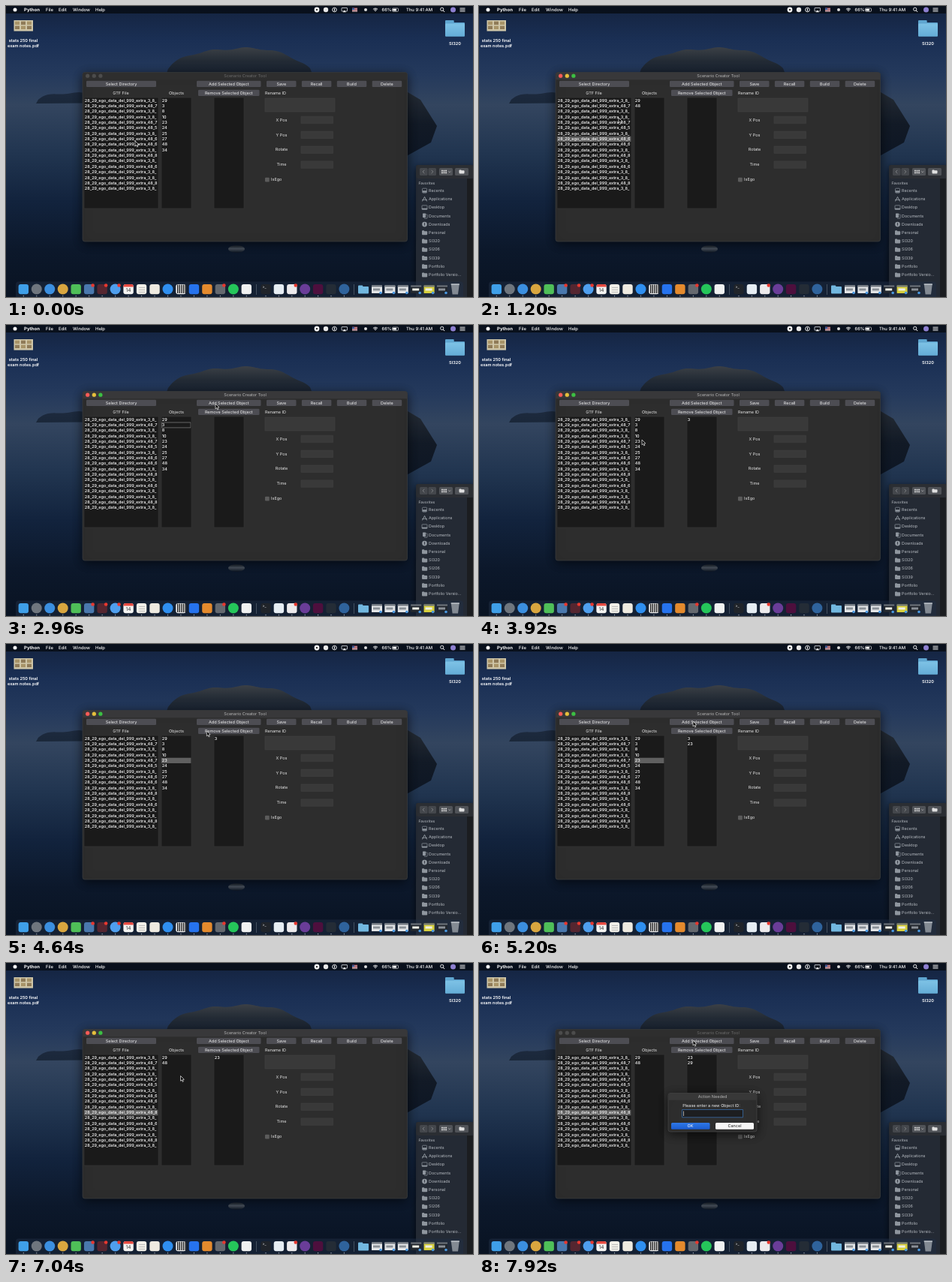
An HTML page with a canvas that plays this animation: 622 by 388 pixels, repeating every 8000 ms.

```html
<!DOCTYPE html>
<html lang="en">
<head>
<meta charset="utf-8">
<title>Scenario Creator Tool</title>
<style>
html, body { margin: 0; width: 622px; height: 388px; overflow: hidden; background: #0c1728; }
canvas { display: block; }
</style>
</head>
<body>
<canvas id="stage" width="622" height="388"></canvas>
<script>
const c = document.getElementById('stage').getContext('2d');
c.textRendering = 'geometricPrecision';
const LOOP = 8000, STEP = 80, HOLD = 320, CLICK = 240, ROW = 7.34;

const files = '3_8_ 48_7 3_8_ 3_8_ 48_7 48_5 3_8_ 48_6 48_6 3_8_ 48_8 3_8_ 48_6 3_8_ 3_8_ 48_8 3_8_'
  .split(' ').map(s => '28_29_ego_data_del_999_extra_' + s);
const allObjects = '29 3 8 10 23 24 25 27 48 34'.split(' ');
const fewObjects = ['29', '48'];

// The pointer arrives at each stop, clicks, and leaves after HOLD.
const stops = [
  { at: 0, x: 172, y: 180 },
  { at: 320, x: 172, y: 178, click: { active: true, file: 7, objects: fewObjects } },
  { at: 1200, x: 186, y: 149, click: { file: 3, objects: allObjects } },
  { at: 2080, x: 212, y: 132, click: { file: -1, object: 1, outline: true } },
  { at: 2880, x: 279, y: 105, click: { object: -1, outline: false, added: ['3'] } },
  { at: 3840, x: 217, y: 153, click: { object: 4 } },
  { at: 4880, x: 285, y: 103, click: { added: ['3', '23'] } },
  { at: 5680, x: 289, y: 115, click: { added: ['23'] } },
  { at: 6480, x: 180, y: 198, click: { file: 10, object: -1, objects: fewObjects } },
  { at: 7280, x: 285, y: 103, click: { added: ['23', '29'], active: false, asking: true } }
];
const start = { active: false, file: -1, object: -1, outline: false, objects: allObjects, added: [], asking: false };

function rect(x, y, w, h, fill, r = 0, stroke) {
  c.beginPath();
  c.roundRect(x, y, w, h, r);
  if (fill) { c.fillStyle = fill; c.fill(); }
  if (stroke) { c.strokeStyle = stroke; c.lineWidth = 0.7; c.stroke(); }
}

function disc(x, y, r, fill) {
  c.beginPath();
  c.arc(x, y, r, 0, 7);
  c.fillStyle = fill;
  c.fill();
}

function ring(x, y, r, color, from = 0, to = 7) {
  c.beginPath();
  c.arc(x, y, r, from, to);
  c.strokeStyle = color;
  c.lineWidth = 0.9;
  c.stroke();
}

function trace(...p) {
  c.beginPath();
  for (let i = 0; i < p.length; i += 2) c.lineTo(p[i], p[i + 1]);
}

function line(color, width, ...p) {
  trace(...p);
  c.strokeStyle = color;
  c.lineWidth = width;
  c.stroke();
}

function poly(fill, ...p) {
  trace(...p);
  c.fillStyle = fill;
  c.fill();
}

function text(s, x, y, color = '#eee', size = 5.5, align = 'left', weight = 400) {
  c.font = `${weight} ${size}px Inter, sans-serif`;
  c.textAlign = align;
  c.textBaseline = 'middle';
  c.fillStyle = color;
  c.fillText(s, x, y);
}

function fade(y0, y1, ...colors) {
  const g = c.createLinearGradient(0, y0, 0, y1);
  colors.forEach((k, i) => g.addColorStop(i / (colors.length - 1), k));
  return g;
}

function shadowed(blur, paint) {
  c.save();
  c.shadowColor = 'rgba(0,0,0,.65)';
  c.shadowBlur = blur;
  c.shadowOffsetY = 3;
  paint();
  c.restore();
}

function folder(x, y, w, h, color) {
  rect(x, y, w * 0.45, h * 0.4, color, 1);
  rect(x, y + h * 0.14, w, h * 0.86, color, 1);
}

// Rounded rocky hill with a rippled outline
function hill(x0, x1, base, height, ...colors) {
  const p = [];
  for (let x = x0; x <= x1; x += 3) {
    const u = (x - x0) / (x1 - x0);
    p.push(x, base - height * Math.sqrt(Math.sin(Math.PI * u)) - Math.sin(x / 7) * 1.2 - Math.sin(x / 17));
  }
  poly(fade(base - height, base, ...colors), ...p);
}

function wallpaper() {
  rect(0, 0, 622, 135, fade(0, 135, '#14233f', '#1a2f54', '#24395c', '#34465f'));
  rect(0, 132, 622, 256, fade(132, 388, '#33455f', '#213550', '#12233d', '#0c182b', '#091322'));
  hill(40, 130, 130, 15, '#1d2a3e', '#1a2739');
  hill(213, 408, 91, 35, '#3a3f45', '#222a34', '#1a2433');
  poly(fade(112, 202, '#252c35', '#121a26', '#0d1624'), 530, 112, 552, 125, 574, 160, 566, 182, 530, 202);
  c.beginPath();
  c.ellipse(307, 324, 11, 5, 0, 0, 7);
  c.fillStyle = fade(318, 329, '#0a121f', '#4a535e', '#0a121f');
  c.fill();
}

function menuBar() {
  rect(0, 0, 622, 10, 'rgba(8,13,22,.85)');
  disc(12, 5, 2.5, '#f4f4f4');
  text('Python', 24, 5, '#fff', 6, 'left', 700);
  [['File', 53], ['Edit', 70], ['Window', 89], ['Help', 119]].forEach(([s, x]) => text(s, x, 5, '#fff', 5.9, 'left', 500));
  disc(414, 5, 3.4, '#fff');
  disc(414, 5, 1.2, '#333');
  disc(426, 5, 3.2, '#e8e8e8');
  ring(437.5, 5, 2.8, '#fff');
  rect(437, 3.2, 1, 3.5, '#fff');
  rect(447, 2.5, 7.5, 4.5, null, 0.5, '#fff');
  poly('#fff', 448.7, 8.3, 450.8, 5.4, 452.9, 8.3);
  for (let i = 0; i < 6; i++) rect(461, 2.5 + i * 0.85, 7, 0.85, i % 2 ? '#e9dfe2' : '#c8434c');
  rect(461, 2.5, 3, 2.6, '#385694');
  disc(479, 5, 2, '#ddd');
  [1.3, 2.9, 4.4].forEach(r => ring(492, 7.5, r, '#fff', -2.35, -0.8));
  text('66%', 500.5, 5, '#fff', 5.8, 'left', 500);
  rect(514.5, 3, 8, 4.3, null, 1, '#ddd');
  rect(515.3, 3.8, 4.7, 2.7, '#fff');
  text('Thu 9:41 AM', 533, 5, '#fff', 5.85, 'left', 500);
  ring(580.7, 4.3, 2.1, '#fff');
  line('#fff', 1, 582.2, 5.9, 584.2, 8);
  disc(595.5, 5, 3.5, '#8d7fd0');
  [3, 5, 7].forEach(y => rect(604.5, y - 0.4, 7, 0.9, '#fff'));
}

function desktop() {
  rect(10.5, 19, 25.5, 14.5, '#cfc6a8');
  for (let i = 0; i < 6; i++) rect(12 + i % 3 * 8, 20.5 + (i > 2) * 6, 6, 4.5, i % 2 ? '#8f7b58' : '#a89468');
  text('stats 250 final', 23, 46, '#fff', 5.6, 'center', 600);
  text('exam notes.pdf', 23, 53, '#fff', 5.6, 'center', 600);
  folder(585, 19, 26, 21.5, '#5fa6d0');
  rect(585, 23.5, 26, 17, fade(23, 41, '#7fc3e6', '#64acd6'), 1);
  text('SI320', 598, 50.5, '#fff', 5.6, 'center', 600);
}

function sidebar() {
  shadowed(8, () => rect(546, 212, 80, 180, '#242a34', 3));
  rect(614, 230, 8, 158, '#1b1d20');
  rect(546, 212, 76, 18, '#2b2e33', 3);
  [551, 562.5].forEach((x, i) => {
    rect(x, 216, 10.5, 10, '#44474c', 1.5);
    const d = i ? 1.1 : -1.1, m = x + 5.2;
    line('#8b8d90', 0.8, m - d, 218.8, m + d, 221, m - d, 223.2);
  });
  [577, 598].forEach(x => rect(x, 216, 18, 10, '#505358', 1.5));
  for (let i = 0; i < 6; i++) rect(580 + i % 3 * 2.6, 218.8 + (i > 2) * 2.6, 1.8, 1.8, '#ddd');
  line('#ccc', 0.7, 589.5, 220.5, 590.8, 221.8, 592.1, 220.5);
  folder(603.5, 218.5, 7, 5, '#e0e0e0');
  text('Favorites', 549.5, 237, '#9a9fa6', 4.9, 'left', 600);
  const names = ['Recents', 'Applications', 'Desktop', 'Documents', 'Downloads', 'Personal',
    'SI320', 'SI206', 'SI339', 'Portfolio', 'Portfolio Versio...'];
  const tone = '#8f969e';
  const icons = {
    Recents(y) { rect(554.5, y - 3, 6, 6, null, 1, tone); rect(555, y, 5, 2.5, tone); },
    Applications(y) { line(tone, 1, 554.5, y + 3, 557.5, y - 3, 560.5, y + 3); line(tone, 0.8, 554, y + 1, 561, y + 1); },
    Desktop(y) { rect(554, y - 2.8, 7, 5.5, null, 0.6, tone); rect(554, y + 1, 7, 1.5, tone); },
    Documents(y) { rect(555, y - 3.3, 4, 5.5, tone, 0.5); rect(557, y - 2, 4, 5.3, null, 0.5, tone); },
    Downloads(y) { disc(557.5, y, 3.4, tone); line('#242a34', 0.9, 557.5, y - 2, 557.5, y + 1.5); }
  };
  names.forEach((s, i) => {
    const y = 246.2 + i * 11.23;
    if (icons[s]) icons[s](y);
    else folder(554, y - 3, 7.2, 6, tone);
    text(s, 563, y, '#b9bec4', 5.4);
  });
}

// Colours in order; "o" marks a round icon, "!" one with a badge
function icons(x, pitch, list) {
  list.split(' ').forEach((s, i) => {
    const m = x + i * pitch, fill = s.slice(0, 7);
    if (s.includes('o')) disc(m, 377.5, 7, fill);
    else rect(m - 6.7, 371, 13.4, 13.2, fill, 3);
    if (s.includes('!')) disc(m + 5, 372.5, 2.3, '#e8382f');
    disc(m, 386.7, 0.6, '#c8ced6');
  });
}

function dock() {
  rect(13, 367.5, 596, 23, 'rgba(32,46,68,.5)', 4);
  icons(23.3, 17.47, '#3f9fe8 #6f767eo #3b8fe0o #d9a63fo #4fbf58 #4a78ad! #552630! #4f9feeo! #f4f4f2 ' +
    '#f1efe8 #eeeae0 #2f8ff0o #e8e8e8 #2673ee #e48a2d #65696f! #25c65ao #f0f1f1');
  icons(346, 17.4, '#20242a #e6edf3 #eceaec! #6a3d98o #4d0f3d #242c36 #2f639co');
  rect(156.4, 371, 13.4, 3.6, '#e74a40', [3, 3, 0, 0]);
  text('14', 163, 379.5, '#333', 6.5, 'center');
  [375, 378, 381].forEach(y => rect(177, y, 8, 0.7, '#aaa'));
  for (let x = 228; x < 239; x += 2.6) rect(x, 371.5, 1.4, 11.5, '#222');
  text('>_', 341.5, 375, '#fff', 4.5);
  [333, 463].forEach(x => rect(x, 371, 0.6, 14, '#65717f'));

  folder(469, 372.5, 14, 11, '#72b7df');
  ['#e2e4e6', '#e2e4e6', '#e2e4e6', '#23282f', '#d6cf3d', '#23282f'].forEach((fill, i) => {
    const x = 487 + i * 17.4;
    rect(x, 372.5, 14, 10.5, fill, 0.5);
    rect(x, 372.5, 14, 2, '#6e757d');
    rect(x + 2, 376.5, 9, 3, i == 3 || i == 4 ? '#eef0e6' : '#8a9097');
    disc(x + 12, 382.5, 1.8, '#4b9ae3');
  });
  poly('#838a93', 592.8, 371, 603.8, 371, 602, 384.5, 594.6, 384.5);
  rect(592.5, 370.3, 11.6, 1.6, '#b5bbc2', 0.8);
}

function button(s, x, y, w) {
  rect(x, y, w, 8.2, '#4d4d53', 1.3);
  text(s, x + w / 2, y + 4.2, '#f0f0f0', 5.5, 'center');
}

function field(x, y, w, h) { rect(x, y, w, h, '#393939', 0, '#404040'); }

function listBox(x, w, items, selected = -1, outline = false) {
  rect(x, 122, w, 148, '#1a1a1a', 0, '#343434');
  c.save();
  c.beginPath();
  c.rect(x, 122, w - 0.6, 148);
  c.clip();
  if (selected >= 0) {
    const y = 122.4 + selected * ROW;
    if (outline) rect(x + 0.6, y + 0.2, w - 1.6, ROW - 0.4, null, 0, '#858585');
    else rect(x, y, w, ROW, '#606060');
  }
  items.forEach((s, i) => text(s, x + 0.8, 126.1 + i * ROW, '#fff', 5.5, 'left', 500));
  c.restore();
}

function appWindow(s) {
  shadowed(14, () => rect(102, 88.5, 432.5, 225.5, '#2d2d2d', 3, '#3c3e40'));
  rect(102.3, 88.8, 432, 9.4, s.active ? '#38383a' : '#2e2e2e', [3, 3, 0, 0]);
  ['#fc5b57', '#e5bf3c', '#3cc043'].forEach((k, i) => disc(108.7 + i * 8.6, 93.2, 2.6, s.active ? k : '#4c4c4c'));
  text('Scenario Creator Tool', 318.5, 93.4, s.active ? '#b8b8b8' : '#6c6c6c', 5.5, 'center');

  button('Select Directory', 107, 99.8, 93);
  button('Add Selected Object', 254, 99.8, 85.5);
  button('Remove Selected Object', 256, 111.8, 81.5);
  ['Save', 'Recall', 'Build', 'Delete'].forEach((label, i) => button(label, 347 + i * 46.9, 99.8, 39.5));
  text('GTF File', 153, 116, '#e4e4e4', 5.5, 'center');
  text('Objects', 227, 116, '#e4e4e4', 5.5, 'center');
  text('Rename ID', 345, 116, '#e4e4e4');

  listBox(104, 99, files, s.file);
  listBox(207, 40, s.objects, s.object, s.outline);
  listBox(277, 40, s.added);

  field(345, 123, 93, 18);
  ['X Pos', 'Y Pos', 'Rotate', 'Time'].forEach((label, i) => {
    const y = 152 + i * 19.9;
    text(label, 367, y, '#e4e4e4', 5.5, 'center');
    field(393, y - 4.8, 42.5, 9.4);
  });
  rect(345, 228.8, 5.8, 5.8, '#5b5b5b', 1);
  text('IsEgo', 353, 231.8, '#e4e4e4');
}

function dialog() {
  shadowed(14, () => rect(252, 173.5, 118, 51.5, '#2e2e2e', 3, '#484848'));
  rect(252.3, 173.8, 117.4, 9, '#383838', [3, 3, 0, 0]);
  text('Action Needed', 311, 178.4, '#b8b8b8', 5.5, 'center');
  text('Please enter a new Object ID:', 309.5, 190, '#f0f0f0', 5.5, 'center');
  rect(270.5, 195.5, 81, 10.3, '#1d1e20', 0, '#3a74b8');
  rect(272, 197.5, 0.7, 6.5, '#e0e0e0');
  rect(256, 213, 51.5, 8.8, fade(213, 222, '#2f78e6', '#1a5bd0'), 1.5);
  text('OK', 281.5, 217.5, '#fff', 5.5, 'center');
  rect(315, 213, 51, 8.8, '#f6f6f6', 1.5);
  text('Cancel', 340.5, 217.5, '#222', 5.5, 'center');
}

function cursor(t) {
  const b = stops.find(p => p.at > t) || stops.at(-1);
  const a = stops[stops.indexOf(b) - 1];
  const leave = a.at ? a.at + HOLD : 0;
  const u = Math.min(1, Math.max(0, (t - leave) / (b.at - leave)));
  const e = u * u * (3 - 2 * u);
  c.save();
  c.translate(a.x + (b.x - a.x) * e, a.y + (b.y - a.y) * e);
  trace(0, 0, 0, 6.8, 1.6, 5.4, 2.7, 7.9, 3.8, 7.4, 2.8, 5, 4.8, 4.8);
  c.closePath();
  c.fillStyle = '#080808';
  c.strokeStyle = '#eee';
  c.lineWidth = 0.7;
  c.fill();
  c.stroke();
  c.restore();
}

function draw(t) {
  const clicks = stops.filter(p => t >= p.at + CLICK).map(p => p.click);
  const s = Object.assign({}, start, ...clicks);
  wallpaper();
  desktop();
  sidebar();
  menuBar();
  appWindow(s);
  if (s.asking) dialog();
  dock();
  cursor(t);
}

let shown = -1;
function tick() {
  const t = Math.floor(performance.now() % LOOP / STEP) * STEP;
  if (t !== shown) draw(shown = t);
  requestAnimationFrame(tick);
}
tick();
</script>
</body>
</html>
```
